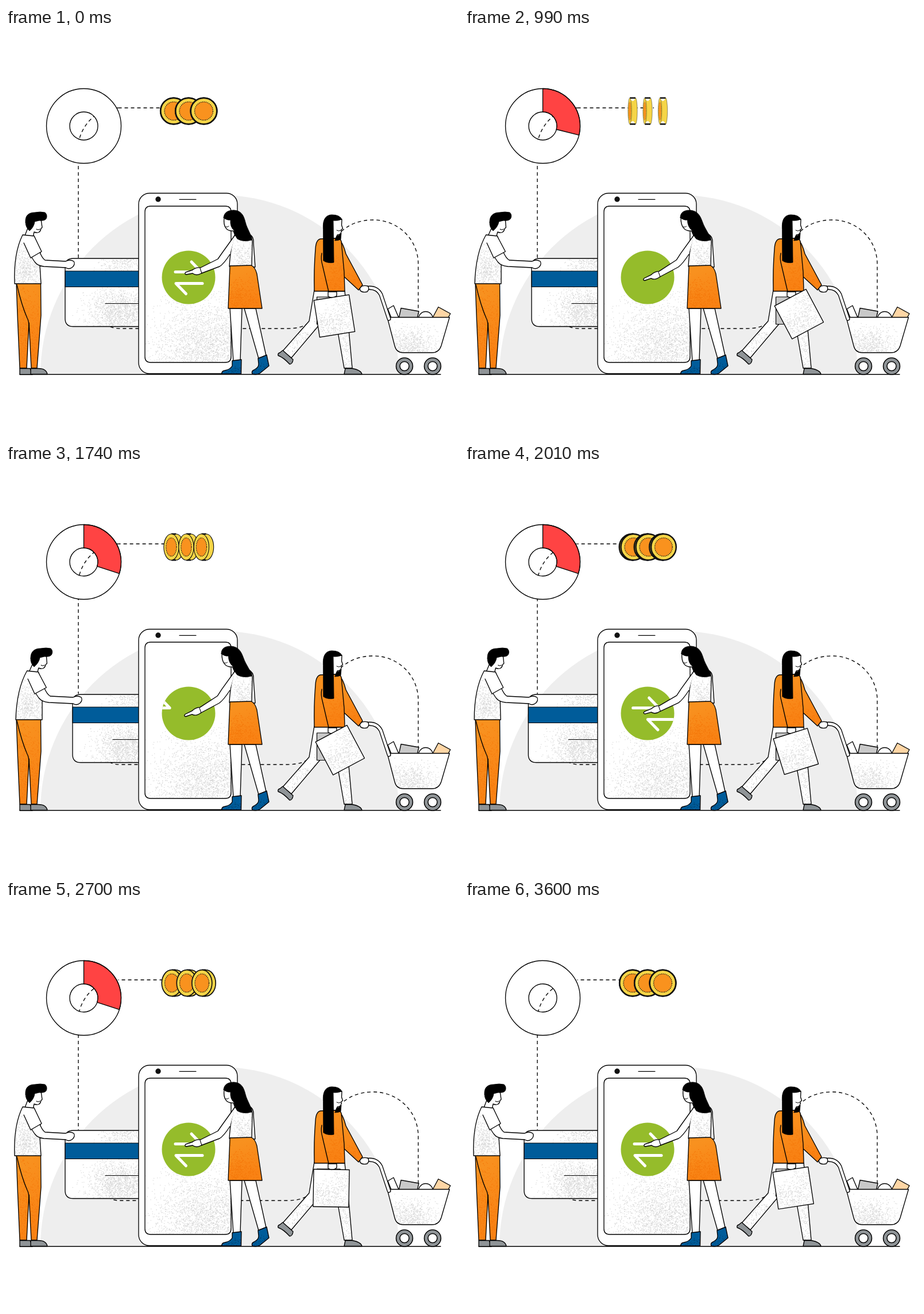
Animation of 789x710 px, one loop 3.63 s. Source, as an HTML page:

```html
<!DOCTYPE html>
<html lang="en">
<head>
<meta charset="utf-8">
<title>Mobile shopping</title>
<style>
html, body { margin: 0; width: 100%; height: 100%; overflow: hidden; background: #fff; }
svg { display: block; width: 789px; height: 710px; }
.dash { fill: none; stroke: #000; stroke-width: 1.35; stroke-dasharray: 6 5; }
</style>
</head>
<body>
<svg id="stage" viewBox="0 0 789 710" xmlns="http://www.w3.org/2000/svg">
  <defs>
    <clipPath id="disc"><circle cx="318" cy="434" r="46.5"/></clipPath>
    <linearGradient id="amber" x1="0" y1="0" x2=".3" y2="1">
      <stop offset=".2" stop-color="#f8911f"/><stop offset="1" stop-color="#f98214"/>
    </linearGradient>
  </defs>
</svg>
<script>
const NS = 'http://www.w3.org/2000/svg';
const LOOP = 3630, STEP = 30;
const BLUE = '#005c9a', AMBER = 'url(#amber)', GREY = '#8f9497', SPECK = '#d6d6d6', RUST = '#f5780a';
const stage = document.getElementById('stage');
const defs = stage.querySelector('defs');

let seed = 11;
const rand = () => (seed = (seed * 16807) % 2147483647) / 2147483647;

function add(parent, tag, attrs) {
  const el = document.createElementNS(NS, tag);
  for (const k in attrs) el.setAttribute(k, attrs[k]);
  parent.appendChild(el);
  return el;
}
const group = (parent = stage) => add(parent, 'g', {});
const shape = (parent, d, fill = '#fff', width = 1.35) => add(parent, 'path', {
  d, fill, stroke: width ? '#000' : 'none', 'stroke-width': width, 'stroke-linejoin': 'round', 'stroke-linecap': 'round'
});
const line = (parent, d, width = 1.35) => shape(parent, d, 'none', width);
const circle = (parent, cx, cy, r, fill, width = 1.35) => add(parent, 'circle', {
  cx, cy, r, fill, stroke: width ? '#000' : 'none', 'stroke-width': width
});

// Speckles gathered around a point and clipped to an outline.
let clips = 0;
function grain(parent, d, x, y, rx, ry, n, color = SPECK) {
  const id = 'clip' + clips++;
  add(add(defs, 'clipPath', { id }), 'path', { d });
  let dots = '';
  for (let i = 0; i < n; i++) {
    const gx = rand() + rand() + rand() - 1.5, gy = rand() + rand() + rand() - 1.5;
    dots += `M${(x + gx * rx * 1.5).toFixed(1)} ${(y + gy * ry * 1.5).toFixed(1)}h1.2`;
  }
  const g = add(parent, 'g', { 'clip-path': `url(#${id})` });
  add(g, 'path', { d: dots, stroke: color, 'stroke-width': 1.2, fill: 'none' });
}
function textured(parent, d, fill, color, ...spots) {
  shape(parent, d, fill, 0);
  for (const s of spots) grain(parent, d, ...s, color);
  return line(parent, d);
}

// Moves every point of an absolute path.
const bend = (d, move) => d.replace(/(-?[\d.]+) (-?[\d.]+)/g, (_, x, y) => move(+x, +y).map(v => v.toFixed(2)).join(' '));

const clamp = v => Math.max(0, Math.min(1, v));
const ease = (t, a, b) => { const u = clamp((t - a) / (b - a)); return u * u * (3 - 2 * u); };

// Smooth curve through [time, value] keys without overshoot.
function track(keys, t) {
  const slope = i => (keys[i + 1][1] - keys[i][1]) / (keys[i + 1][0] - keys[i][0]);
  const tangent = i => {
    if (i === 0) return slope(0);
    if (i === keys.length - 1) return slope(i - 1);
    const a = slope(i - 1), b = slope(i);
    return a * b <= 0 ? 0 : 2 * a * b / (a + b);
  };
  let i = 0;
  while (i < keys.length - 2 && t > keys[i + 1][0]) i++;
  const [t0, v0] = keys[i], [t1, v1] = keys[i + 1];
  const h = t1 - t0, u = clamp((t - t0) / h), w = 1 - u;
  return v0 * (1 + 2 * u) * w * w + v1 * u * u * (3 - 2 * u) + h * u * w * (tangent(i) * w - tangent(i + 1) * u);
}

/* Background */
shape(stage, 'M60 603A312 312.500 0 0 1 684 603Z', '#eeeeee', 0);
line(stage, 'M24 602.700H757', 1.4);
const dashes = [
  'M126 400V205C127 178 152 139 195.500 139',
  'M195.500 139H329',
  'M174 512Q180 523 199 523H490Q518 523 529 511',
  'M584 354C600 340 618 334 640 334C683 334 718 368 718 411V498'
].map(d => add(stage, 'path', { d, class: 'dash' }));

/* Ring chart and coins */
const RX = 135.5, RY = 170.5, R1 = 65, R0 = 24.5;
const hoop = r => `M${RX - r} ${RY}a${r} ${r} 0 1 1 ${2 * r} 0a${r} ${r} 0 1 1 ${-2 * r} 0Z`;
shape(stage, hoop(R1) + hoop(R0)).setAttribute('fill-rule', 'evenodd');
const wedge = shape(stage, '', '#ff4343');
const coins = group();

/* Card */
const card = group();
textured(card, 'M117 401H260V519.5H117Q103 519.5 103 505.5V415Q103 401 117 401Z', '#fff', SPECK,
  [198, 494, 38, 26, 1700], [208, 411, 30, 10, 260]);
shape(card, 'M103 423H260V450.5H103Z', BLUE, 1.2);
line(card, 'M173 479.5H260', 1.2);

/* Phone */
add(stage, 'rect', { x: 231, y: 287.5, width: 172, height: 314, rx: 19, fill: '#fff', stroke: '#000', 'stroke-width': 1.35 });
textured(stage, 'M252 310H382Q392 310 392 320V572Q392 582 382 582H252Q242 582 242 572V320Q242 310 252 310Z', '#fff', SPECK,
  [352, 556, 62, 54, 3300]);
circle(stage, 265, 298, 4.7, '#111', 0);
line(stage, 'M302 298.3H331', 1.2);
circle(stage, 318, 434, 46.5, '#95bc2b', 0);
const icon = add(stage, 'g', {
  'clip-path': 'url(#disc)', fill: 'none', stroke: '#fff', 'stroke-width': 5, 'stroke-linecap': 'round', 'stroke-linejoin': 'round'
});
const arrowUp = add(icon, 'path', { d: 'M295 424.500H340L323 407' });
const arrowDown = add(icon, 'path', { d: 'M342 444.500H296L313.500 462.500' });

/* Man */
const pants = 'M18 444H60.5L61 500L54 592H44L40 513L36 592H24L20 500Z';
textured(stage, pants, AMBER, RUST, [34, 545, 24, 60, 800]);
line(stage, 'M19 447Q27 482 37 505Q40 510 40 520');
shape(stage, 'M24 592.5H42L46 603H24Z', GREY);
shape(stage, 'M43 592.5H55Q70 592 72 602.5H43Z', GREY);
const man = group();
shape(man, 'M38 348L33 361L47 364L49 355Q59 359 61 349L63 347L61 333L44 333Z');
line(man, 'M53 350Q56 352 59 350', 1.1);
shape(man, 'M34 338C33 326 40 321 50 321Q60 319 68 321Q73 326 70 332Q67 336 58 335L50 337Q49 346 41 353Q34 347 34 338Z', '#000', 0.8);
textured(man, 'M29 360L49 362L60 390L58 398L61 445H15Q13 392 29 360Z', '#fff', SPECK, [36, 425, 22, 30, 800]);
const ARM = 'M44 398L50 407Q55 414 66 415L104 417Q110 421 116 416Q121 411 118 406Q111 402 104 406L68 404Q63 401 58 388Z';
const SLEEVE = 'M31 374L43 400L62 389L49 362';
const manArm = shape(stage, ARM);
const manSleeve = shape(stage, SLEEVE);

/* Woman at the phone */
shape(stage, 'M390 488L396 580H408L411 488Z');
shape(stage, 'M415 488L440 575L453 570L435 488Z');
const bootA = 'M394 579L410 577L409.500 602H376Q375 597 381 596Q391 594 394 588Z';
const bootB = 'M439 575L454 569L458 588L442 601Q436 604 429 602Q427 597 432 595Q440 591 440 585Z';
textured(stage, bootA, BLUE, '#00416f', [400, 598, 14, 5, 60]);
textured(stage, bootB, BLUE, '#00416f', [445, 594, 12, 8, 60]);
shape(stage, 'M420 357Q432 361 431 374L434 416H424Z');
textured(stage, 'M399 358Q391 380 389 415H428L429 372Q428 358 418 356Z', '#fff', SPECK, [418, 402, 18, 20, 400]);
textured(stage, 'M390 414L427 413Q434 416 437 428L446 488H387Z', AMBER, RUST, [400, 476, 28, 24, 800]);
const REACH = 'M399 360L376 392L369 402L339 417Q331 416 325 421L313 425Q310 428 314 429L325 427Q332 432 340 427L372 415Q379 411 390 394';
const reach = shape(stage, REACH);
const cuff = line(stage, '', 1.1);
const head = group();
shape(head, 'M380 330C378 346 384 354 396 353L399 361L410 360L400 330Z');
line(head, 'M383 346Q386 347 388 345', 1);
shape(head, 'M379 330C380 320 388 317 397 317C410 318 414 326 417 338C420 350 428 360 428 369Q413 373 403 367Q398 361 397 352Q390 346 391 334Q384 335 379 330Z', '#000', 0.8);

/* Shopper */
const backLeg = 'M537 456L528 510L482 562L497 574L547 515L575 458Z';
const frontLeg = 'M560 458L579 535L589 592H603L597 525L590 458Z';
textured(stage, frontLeg, '#fff', SPECK, [594, 562, 12, 36, 300]);
textured(stage, backLeg, '#fff', SPECK, [510, 545, 24, 26, 260]);
shape(stage, 'M482 561L500 577Q499 585 494 585Q483 573 474 570Q473 566 477 565Z', GREY);
shape(stage, 'M591 592.5H603Q618 595 620 602.500H589Z', GREY);
shape(stage, 'M541.500 468H582V515.500H541.500Z', '#c9c9c9', 1.2);

/* Cart */
const goods = group();
shape(goods, 'M665 489L675 483L684 504H671Z');
shape(goods, 'M688 487.500L719 493L716 506H684Z', '#c9c9c9');
circle(goods, 731, 506, 12.5, '#fff');
shape(goods, 'M753 485.500L774 497L768 508L742 506Z', '#ffd6a5');
textured(stage, 'M664 503.500H772.500L758 553Q754 565 742 565H692Q680 565 677 553Z', '#fff', SPECK, [703, 552, 30, 20, 800]);
const bar = 'M628 452.500Q646 450 653 464L667 506';
line(stage, bar, 7);
line(stage, bar, 4.3).setAttribute('stroke', '#fff');
for (const x of [694, 743]) {
  circle(stage, x, 588.5, 14.5, GREY, 1.5);
  circle(stage, x, 588.5, 8, '#fff', 1.5);
}

/* Shopper, upper body */
shape(stage, 'M616 452Q621 447 630 449Q634 454 629 459Q621 461 617 457Z');
textured(stage, 'M580 367Q587 374 592 393L621 447L614 456L587 431Z', AMBER, RUST, [605, 440, 12, 14, 90]);
textured(stage, 'M548 367Q540 368 539 384Q536 420 537 458H590L589 425L584 371Q582 366 576 366Z', AMBER, RUST, [578, 437, 18, 30, 380]);
line(stage, 'M550 392Q548 402 551 412L562 459');
shape(stage, 'M569 334L585 333L584.500 343L586.500 349L584 351Q585 360 577 360L575 366H569Z');
line(stage, 'M576 352Q580 354.500 583 352', 1);
shape(stage, 'M576 362Q582 361 584 357L583 368Q578 370 573 370Z', '#000', 0.8);
shape(stage, 'M552.500 350C551 332 558 325 568 325Q581 325 585 333Q577 336 570 335L571 408Q560 410 553 405Z', '#000', 0.8);

/* Hand and bag */
shape(stage, 'M561 459H576V466Q569 472 561 467Z');
const bag = group();
textured(bag, 'M536 469H598V534H536Z', '#fff', SPECK, [560, 515, 28, 18, 420], [585, 485, 18, 14, 100]);

const SWING = [[0, -9], [480, -19.5], [990, -28], [1350, -28.8], [1740, -28], [2340, -1.5], [2720, 1], [3060, 0], [3240, -3.5], [3630, -9]];
const FLIP = [[0, 0], [450, 0], [990, 98], [1740, 305], [2340, 448], [3060, 532], [3360, 540], [3630, 540]];

function coin(x, deg) {
  const y = 144.5, r = 22.8;
  let a = deg % 180;
  if (a > 90) a -= 180;
  a *= Math.PI / 180;
  const c = Math.cos(a), off = 5 * Math.sin(a), rx = Math.max(r * c, .8);
  const w = .4 + 2.2 * c * c;
  const oval = (cx, kx, ky, rest) => `<ellipse cx="${cx}" cy="${y}" rx="${kx}" ry="${ky}" ${rest}/>`;
  const rim = `fill="#f5d547" stroke="#111" stroke-width="${w}"`;
  const half = Math.abs(off);
  let out = oval(x - off, rx, r, rim) + `<rect x="${x - half}" y="${y - r}" width="${2 * half}" height="${2 * r}" fill="#f5d547"/>`;
  if (c < .3) {
    out += `<path d="M${x - 4} ${y - r + 1}h8l-2 4h-4zM${x - 4} ${y + r - 1}h8l-2 -4h-4z" fill="#fff"/>`;
  }
  out += `<path d="M${x - half} ${y - r}h${2 * half}M${x - half} ${y + r}h${2 * half}" stroke="#111" stroke-width="2.5"/>`;
  out += oval(x + off, rx, r, rim);
  return out + oval(x + off, rx * .7, r * .7,
    `fill="#f9921e" stroke="#111" stroke-width="${1.3 * Math.min(1, c * 1.6)}" stroke-dasharray="1.5 1.5"`);
}

function sector(deg) {
  if (deg < .5) return '';
  const a = deg * Math.PI / 180, s = Math.sin(a), c = -Math.cos(a);
  return `M${RX} ${RY - R1}A${R1} ${R1} 0 0 1 ${RX + R1 * s} ${RY + R1 * c}` +
    `L${RX + R0 * s} ${RY + R0 * c}A${R0} ${R0} 0 0 0 ${RX} ${RY - R0}Z`;
}

// Leaves on one side, comes back from the other.
const pass = (t, lag) => t < 1200 ? 93 * ease(t, 150 + lag, 730 + lag) : 93 * (ease(t, 1485 + lag, 2065 + lag) - 1);

function draw(t) {
  const p = ease(t, 0, 840) - ease(t, 1745, 2325);

  card.setAttribute('transform', `translate(${13 * p} 0)`);
  man.setAttribute('transform', `matrix(1 0 ${-.065 * p} 1 ${(.065 * 445 + 2) * p} 0)`);
  const slide = (x, y) => [x + p * (7 + 6 * clamp((x - 50) / 55)), y];
  manArm.setAttribute('d', bend(ARM, slide));
  manSleeve.setAttribute('d', bend(SLEEVE, slide));

  const dip = (x, y) => [x - p * clamp((400 - x) / 60), y + p * 10.5 * clamp((378 - x) / 64)];
  reach.setAttribute('d', bend(REACH, dip));
  cuff.setAttribute('d', bend('M338 418L341 427', dip));
  head.setAttribute('transform', `matrix(1 0 ${.1 * p} 1 ${-37 * p} 0)`);

  arrowUp.setAttribute('transform', `translate(${pass(t, 0)} 0)`);
  arrowDown.setAttribute('transform', `translate(${-pass(t, 130)} 0)`);

  bag.setAttribute('transform', `rotate(${track(SWING, t)} 567 470)`);
  wedge.setAttribute('d', sector(108 * (ease(t, 600, 1040) - ease(t, 2940, 3240))));
  const turn = track(FLIP, t);
  coins.innerHTML = [292, 318, 344.5].map(x => coin(x, turn)).join('');

  const drift = 5 * ease(t, 1300, 2340);
  for (const d of dashes) d.setAttribute('stroke-dashoffset', drift);
}

const start = performance.now();
function tick() {
  const t = (performance.now() - start) % LOOP;
  draw(Math.floor(t / STEP) * STEP);
  requestAnimationFrame(tick);
}
tick();
</script>
</body>
</html>
```
